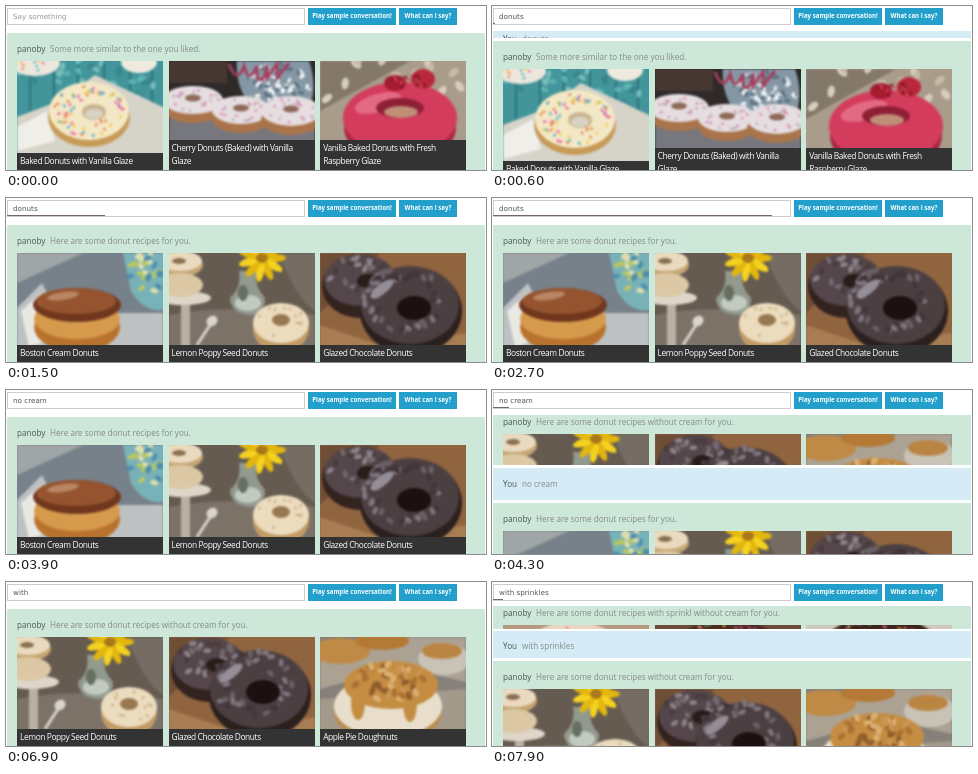
Write an HTML page that moves like this. It is 480 px wide and 164 px high and loops after 8000 ms.

```html
<!DOCTYPE html>
<html lang="en">
<head>
<meta charset="utf-8">
<title>Recipe chat</title>
<style>
html, body { margin: 0; width: 100%; height: 100%; overflow: hidden; background: #fff; }
#stage { position: relative; width: 480px; height: 164px; overflow: hidden; font-family: "Open Sans", sans-serif; }
#stage div, #stage span, #stage svg { position: absolute; white-space: nowrap; box-sizing: border-box; }
#input { left: 1px; top: 2px; width: 298px; height: 17px; border: 1px solid #ccc; }
#typed { left: 5px; top: 0; color: #555; font: 7.2px/15px "DejaVu Sans", sans-serif; }
#typed.empty { color: #999; }
#bar { left: 1px; top: 17px; height: 1px; background: #74666a; }
#stage .button { top: 2px; height: 17px; background: #229fca; color: #fff; text-align: center; font-size: 6.1px; font-weight: 700; line-height: 16.5px; }
.panel { left: 1px; width: 478px; overflow: hidden; background: #cde7d9; }
.panel.you { background: #d5ecf6; }
.inner { left: 0; top: 0; width: 478px; height: 280px; }
.who, .line { top: 10px; font-size: 8.15px; line-height: 12px; }
.who { left: 10px; color: #4d5552; }
.line { left: 43px; color: #848c88; }
.you .line { left: 29px; }
.card { top: 28px; width: 146px; height: 109px; overflow: hidden; }
.card svg { left: 0; top: 0; }
#stage .caption { left: 0; bottom: 0; width: 146px; padding: 1px 3px 3px; background: #333; color: #fff; font-size: 8.4px; letter-spacing: -.4px; line-height: 13px; white-space: normal; }
</style>
</head>
<body>
<div id="stage">
  <div id="input"><span id="typed"></span></div>
  <div id="bar"></div>
  <div class="button" style="left:302px;width:88px">Play sample conversation!</div>
  <div class="button" style="left:393px;width:58px">What can I say?</div>
</div>
<script>
const LOOP = 8000, STEP = 100, SLIDE = 440, BAR = 2680, BAR_WIDTH = 298;
const TOP = 24, GAP = 3, PADDING = 10;
const stage = document.getElementById('stage');
const typed = document.getElementById('typed');
const bar = document.getElementById('bar');

let seed = 1;
const random = () => (seed = seed * 16807 % 2147483647) / 2147483647;

const oval = (x, y, rx, ry, fill, turn = 0) =>
  `<ellipse cx="${x}" cy="${y}" rx="${rx}" ry="${ry}" fill="${fill}" transform="rotate(${turn} ${x} ${y})"/>`;
const box = (x, y, w, h, fill) => `<rect x="${x}" y="${y}" width="${w}" height="${h}" fill="${fill}"/>`;
const path = (d, fill) => `<path d="${d}" fill="${fill}"/>`;
const backdrop = fill => box(-5, -5, 156, 120, fill);

// Small dashes or crumbs spread over an elliptical ring.
function scatter(x, y, rx, ry, count, colors, inner = 0.4, size = 1.7) {
  let out = '';
  for (let i = 0; i < count; i++) {
    const angle = random() * 6.283, reach = inner + (1 - inner) * Math.sqrt(random());
    out += oval(x + rx * reach * Math.cos(angle), y + ry * reach * Math.sin(angle),
      size, size * 0.6, colors[i % colors.length], random() * 180);
  }
  return out;
}

function flower(x, y) {
  let out = '';
  for (let i = 0; i < 11; i++) {
    const angle = i * 6.283 / 11;
    out += oval(x + 13 * Math.cos(angle), y + 13 * Math.sin(angle), 11, 4,
      i % 2 ? '#f5d21f' : '#e3b70f', i * 360 / 11);
  }
  return out + oval(x, y, 6, 5, '#a8781a');
}

const candy = ['#e667a8', '#f2cf4a', '#5fb7c9', '#e98f5a'];

const scenes = {
  baked: () => backdrop('#42959a')
    + [12, 36, 60, 86, 112, 134].map(x => box(x, 0, 2, 50, '#2f737b')).join('')
    + scatter(70, 22, 75, 25, 40, ['#5fb3b3', '#39858d', '#78bdba'], 0, 4)
    + path('M0 56 L42 40 L78 14 L150 48 V112 H0Z', '#d6d3c9')
    + oval(18, 2, 25, 13, '#ece6dc') + scatter(18, 2, 22, 11, 14, candy, 0) + oval(122, 1, 18, 11, '#eeeae0')
    + path('M0 66 L30 50 L38 80 L0 90Z', '#efeee9')
    + oval(72, 56, 41, 30, '#c79a58') + oval(72, 50, 40, 29, '#f3e8c6')
    + scatter(72, 50, 36, 25, 65, candy, .4, 2) + oval(77, 51, 12, 8, '#c8b694') + oval(77, 53, 9, 5, '#d9d3c5'),
  cherry: () => backdrop('#2f2928')
    + box(0, 0, 58, 22, '#463733') + box(0, 55, 146, 54, '#77777e')
    + path('M68 0 H140 Q150 30 138 50 H88 Q66 32 68 0Z', '#8597a5')
    + scatter(108, 25, 32, 22, 75, ['#d9e4e8', '#5d7484', '#f2f5f5'], 0, 3)
    + '<path d="M60 3 Q68 24 75 5 Q80 24 88 5 V17 Q95 24 98 4 V17 L108 3 V17 L120 2" fill="none" stroke="#a3405e" stroke-width="3"/>'
    + [[24, 39, 30, 14], [72, 49, 29, 14], [122, 50, 30, 15]].map(([x, y, rx, ry]) =>
      oval(x, y + 9, rx, ry, '#a9744b') + oval(x, y, rx, ry, '#e5dde0')
      + scatter(x, y, rx * .85, ry * .8, 18, ['#d884a8', '#b9a9b8']) + oval(x, y - 2, 8, 3.5, '#8e6a58')).join(''),
  raspberry: () => backdrop('#a99c8b')
    + path('M0 0 H90 L0 50Z', '#837869')
    + scatter(75, 30, 75, 40, 22, ['#d8cebd', '#c6baa8'], 0, 6)
    + oval(80, 66, 56, 38, '#a92542') + oval(80, 57, 57, 36, '#d43c5d')
    + oval(58, 42, 24, 9, '#e46a84', -16) + oval(80, 47, 24, 10, '#8e2036') + oval(81, 51, 17, 6, '#c08d77')
    + oval(75, 22, 11, 8, '#a51c30') + oval(103, 18, 12, 10, '#b8273a')
    + scatter(90, 20, 22, 7, 16, ['#cc4a58', '#7f142a'], 0, 2),
  boston: () => backdrop('#77818a')
    + path('M0 0 H66 L0 30Z', '#a0a5a6') + path('M0 55 L25 30 L40 60 L146 60 V110 H0Z', '#bdc1c2')
    + path('M4 58 L24 40 L36 86 L12 94Z', '#e9e9e4')
    + path('M106 0 H150 V56 Q128 62 114 38Z', '#78b2b8')
    + scatter(130, 22, 17, 25, 26, ['#b7c665', '#4e8fae', '#dedfb0'], 0, 4)
    + oval(60, 74, 43, 25, '#b8722d') + oval(60, 66, 43, 20, '#d69a4c')
    + oval(60, 52, 44, 17, '#70371e') + oval(59, 48, 40, 13, '#95542f') + oval(46, 43, 16, 4, '#b98562', -8),
  lemon: () => backdrop('#665b51')
    + path('M0 62 Q60 50 146 62 V112 H0Z', '#7c7268') + path('M110 0 H150 V60 Q128 50 110 0Z', '#756c64')
    + box(12, 50, 9, 45, '#b9b1a4') + oval(14, 45, 28, 7, '#ddd6c9')
    + oval(11, 12, 23, 12, '#c6a675') + oval(11, 8, 22, 10, '#eadbc0') + oval(11, 32, 23, 12, '#dcc8a4') + oval(10, 8, 7, 3, '#8a7050')
    + path('M70 18 H87 Q85 34 96 45 Q96 62 80 62 Q62 60 61 45 Q73 34 70 18Z', '#929a8f')
    + oval(79, 50, 13, 8, '#c3cbc1') + oval(74, 40, 5, 8, '#666f5f') + flower(93, 5)
    + '<path d="M28 92 L41 72" stroke="#d9d4cc" stroke-width="3"/>' + oval(43, 68, 6, 5, '#d9d4cc', -40)
    + oval(112, 76, 28, 23, '#c29b65') + oval(112, 70, 28, 20, '#ecdcbe') + oval(112, 67, 9, 6, '#96774f')
    + scatter(112, 70, 24, 17, 12, ['#cbb48c'], .5, 2),
  chocolate: () => backdrop('#8f643f')
    + path('M0 0 H60 L0 60Z', '#6f4e36') + path('M0 72 L60 92 L146 80 V112 H0Z', '#a87d54')
    + oval(40, 33, 38, 32, '#33231f') + oval(40, 27, 36, 26, '#54464a')
    + scatter(38, 22, 30, 18, 26, ['#746970', '#4a3c3d', '#8c8289'], .3, 4) + oval(48, 28, 11, 7, '#291c19')
    + oval(91, 58, 51, 44, '#2c201e') + oval(90, 52, 49, 39, '#4c3f42')
    + scatter(84, 46, 40, 32, 50, ['#6b6066', '#41353a', '#807680'], .5, 4)
    + oval(62, 36, 14, 5, '#968e97', -38) + oval(94, 55, 17, 12, '#1c1110'),
  apple: () => backdrop('#85807a')
    + path('M0 10 L70 0 H146 V45 L80 30 L0 52Z', '#aba294')
    + oval(20, 14, 30, 13, '#bf8a45') + oval(62, 4, 27, 9, '#b47a35') + oval(124, 22, 26, 16, '#c9c2b6') + oval(122, 14, 20, 8, '#ba8543')
    + path('M0 62 L146 52 V112 H0Z', '#a49a8c')
    + oval(68, 74, 54, 34, '#b98c50') + oval(68, 69, 54, 31, '#e8decb')
    + oval(71, 48, 47, 24, '#c48d42') + oval(38, 66, 7, 17, '#c48d42') + oval(90, 67, 7, 18, '#c48d42')
    + scatter(70, 44, 38, 19, 42, ['#aa7032', '#dcb071', '#8f5e2b', '#c99450'], 0, 4.5),
  sugared: () => backdrop('#b59a80') + oval(70, 40, 55, 44, '#e8d6c2') + scatter(70, 40, 50, 40, 60, candy),
  party: () => backdrop('#6a4e3a') + oval(73, 38, 62, 44, '#4c2c22')
    + scatter(73, 38, 60, 42, 90, ['#66b56a', '#e667a8', '#f2cf4a']),
  dark: () => backdrop('#cfc8bd') + oval(75, 35, 65, 45, '#3d241c') + scatter(75, 35, 62, 42, 110, candy)
};

function card([scene, caption], index) {
  seed = 77 + index;
  return `<div class="card" style="left:${10 + 151.6 * index}px">
    <svg width="146" height="109" viewBox="0 0 146 109"><g style="filter:blur(.8px)">${scenes[scene]()}</g></svg>
    ${caption ? `<div class="caption">${caption}</div>` : ''}</div>`;
}

function addPanel(kind, start, text, cards = []) {
  const el = document.createElement('div');
  el.className = 'panel ' + kind;
  el.innerHTML = `<div class="inner"><span class="who">${kind === 'you' ? 'You' : 'panoby'}</span>
    <span class="line">${text}</span>${cards.map(card).join('')}</div>`;
  stage.append(el);
  return { el, inner: el.firstChild, start, height: kind === 'you' ? 32 : 280 };
}

const lemon = ['lemon', 'Lemon Poppy Seed Donuts'];
const glazed = ['chocolate', 'Glazed Chocolate Donuts'];

// Newest first, as they stack on the page.
const panels = [
  addPanel('bot', 7819, 'Here are some donut recipes with sprinkl without cream for you.', [['sugared'], ['party'], ['dark']]),
  addPanel('you', 7583, 'with sprinkles'),
  addPanel('bot', 4177, 'Here are some donut recipes without cream for you.', [lemon, glazed, ['apple', 'Apple Pie Doughnuts']]),
  addPanel('you', 3890, 'no cream'),
  addPanel('bot', 680, 'Here are some donut recipes for you.', [['boston', 'Boston Cream Donuts'], lemon, glazed]),
  addPanel('you', 460, 'donuts'),
  addPanel('bot', -SLIDE, 'Some more similar to the one you liked.', [
    ['baked', 'Baked Donuts with Vanilla Glaze'],
    ['cherry', 'Cherry Donuts (Baked) with Vanilla Glaze'],
    ['raspberry', 'Vanilla Baked Donuts with Fresh Raspberry Glaze']])
];

const typing = [
  [0, ''], [100, 'd'], [200, 'don'], [300, 'donut'], [400, 'donuts'],
  [3200, ''], [3300, 'no'], [3500, 'no c'], [3600, 'no cr'], [3700, 'no cre'], [3900, 'no cream'],
  [6600, ''], [6700, 'w'], [6800, 'wit'], [6900, 'with'], [7100, 'with spr'],
  [7300, 'with sprin'], [7400, 'with sprinkl'], [7500, 'with sprinkles']
];
const submits = [460, 3900, 7580];

const swing = x => 0.5 - 0.5 * Math.cos(Math.PI * Math.min(1, Math.max(0, x)));

function layout(t) {
  let y = TOP, previous = 0;
  for (const { el, inner, start, height } of panels) {
    const open = swing((t - start) / SLIDE);
    el.style.display = open > 0 ? 'block' : 'none';
    if (!open) continue;
    y += GAP * Math.max(open, previous);
    el.style.top = y + 'px';
    el.style.height = height * open + 'px';
    inner.style.top = -PADDING * (1 - open) + 'px';
    y += height * open;
    previous = open;
  }
}

function draw() {
  const t = Math.floor(performance.now() % LOOP / STEP) * STEP;
  const text = typing.filter(([at]) => at <= t).pop()[1];
  typed.textContent = text || 'Say something';
  typed.className = text ? '' : 'empty';
  const sent = submits.find(at => t >= at && t < at + BAR);
  bar.style.width = (sent === undefined ? 0 : BAR_WIDTH * swing((t - sent) / BAR)) + 'px';
  layout(t);
  requestAnimationFrame(draw);
}
draw();
</script>
</body>
</html>
```
